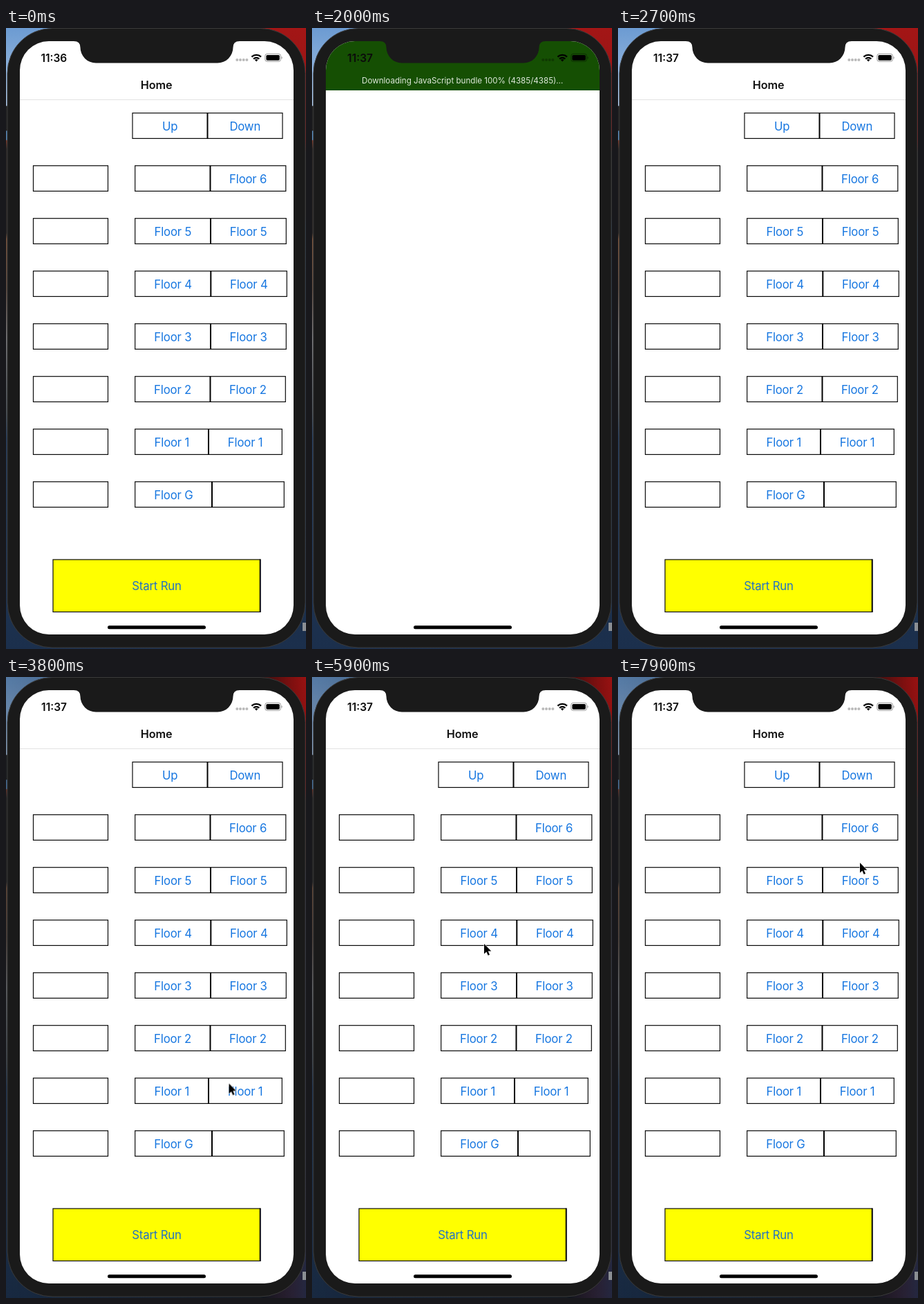
Animation, 434 px wide and 896 px high, one loop 8 s. Source, as an HTML page:

```html
<!DOCTYPE html>
<html lang="en">
<head>
<meta charset="utf-8">
<title>Elevator</title>
<style>
html, body { margin: 0; width: 100%; height: 100%; overflow: hidden; background: #1a1a1a; }
svg { display: block; width: 434px; height: 896px; }
text { font-family: Inter, Roboto, sans-serif; text-anchor: middle; }
.label { font-size: 16.8px; letter-spacing: -.2px; fill: #1676e0; }
.run { fill: #2371c4; }
.title { font-size: 16.2px; font-weight: 600; letter-spacing: -.1px; fill: #111; }
.clock { font-size: 15.5px; font-weight: 600; fill: #0b0b0b; }
.note { font-size: 11.6px; fill: #dfe9dc; }
.box { fill: none; stroke: #0a0a0a; stroke-width: 1.2; }

.early, .late, .page, .banner, .dusk { animation: 8s step-end infinite; }
.early { animation-name: early; }
.late { animation-name: late; }
.page { animation-name: page; }
.banner { animation-name: banner; }
.dusk { animation-name: dusk; }
.cursor { animation: show 8s step-end infinite, move 8s linear infinite; }

@keyframes early { 0% { opacity: 1 } 20%, 100% { opacity: 0 } }
@keyframes late { 0% { opacity: 0 } 20%, 100% { opacity: 1 } }
@keyframes page { 0% { opacity: 1 } 25% { opacity: 0 } 30%, 100% { opacity: 1 } }
@keyframes banner { 0% { opacity: 0 } 25% { opacity: 1 } 32.5% { opacity: .5 } 33.75%, 100% { opacity: 0 } }
@keyframes dusk { 0% { opacity: 0 } 46.25%, 100% { opacity: 1 } }
@keyframes show { 0% { opacity: 0 } 37.5%, 100% { opacity: 1 } }
/* the pointer is sampled ten times a second */
@keyframes move {
  0%, 36.25% { transform: translate(424px, 812px); animation-timing-function: steps(6) }
  43.75%, 45% { transform: translate(318px, 600px); animation-timing-function: steps(11) }
  58.75% { transform: translate(343px, 526px); animation-timing-function: steps(7) }
  67.5%, 70% { transform: translate(338px, 513px); animation-timing-function: steps(3) }
  73.75% { transform: translate(249px, 385px); animation-timing-function: steps(3) }
  77.5%, 78.75% { transform: translate(243px, 306px); animation-timing-function: steps(9) }
  90%, 92.5% { transform: translate(328px, 437px); animation-timing-function: steps(5) }
  98.75%, 100% { transform: translate(350px, 268px) }
}
</style>
</head>
<body>
<svg viewBox="0 0 434 896">
  <defs>
    <linearGradient id="left" x2="0" y2="1">
      <stop offset="0" stop-color="#6c9bd2"/>
      <stop offset=".125" stop-color="#a9c3e2"/>
      <stop offset=".126" stop-color="#222"/>
      <stop offset=".165" stop-color="#222"/>
      <stop offset=".166" stop-color="#5584b4"/>
      <stop offset=".18" stop-color="#5584b4"/>
      <stop offset=".181" stop-color="#7a3a2c"/>
      <stop offset=".195" stop-color="#2a2725"/>
      <stop offset=".33" stop-color="#2a2725"/>
      <stop offset=".34" stop-color="#74513b"/>
      <stop offset=".42" stop-color="#5b4a40"/>
      <stop offset=".5" stop-color="#77777a"/>
      <stop offset=".62" stop-color="#4a5056"/>
      <stop offset=".66" stop-color="#263d5c"/>
      <stop offset="1" stop-color="#1b2f4c"/>
    </linearGradient>
    <linearGradient id="right" x2="0" y2="1">
      <stop offset="0" stop-color="#a31616"/>
      <stop offset=".18" stop-color="#8c1414"/>
      <stop offset=".2" stop-color="#333"/>
      <stop offset=".3" stop-color="#333"/>
      <stop offset=".32" stop-color="#24384f"/>
      <stop offset="1" stop-color="#1b2f4c"/>
    </linearGradient>
    <linearGradient id="shade">
      <stop offset="0" stop-color="#101820" stop-opacity=".25"/>
      <stop offset=".86" stop-color="#101010" stop-opacity=".75"/>
      <stop offset="1" stop-color="#500" stop-opacity=".15"/>
    </linearGradient>
    <clipPath id="screen"><rect x="20" y="19" width="396" height="856" rx="42"/></clipPath>
  </defs>

  <rect width="217" height="896" fill="url(#left)"/>
  <rect x="217" width="217" height="896" fill="url(#right)"/>
  <rect class="dusk" width="434" height="896" fill="url(#shade)"/>
  <path d="M429 858h5v12h-5z" fill="#8b8f94"/>
  <rect x="2" y=".5" width="431" height="893.5" rx="65" fill="#1a1a1a" stroke="#3b3b3b"/>

  <g clip-path="url(#screen)">
    <rect x="20" y="19" width="396" height="856" fill="#fff"/>
    <g class="page">
      <path d="M20 103.5H416" stroke="#e2e2e2"/>
      <text class="title" x="217.7" y="88">Home</text>
      <g id="rows"></g>
      <rect x="68" y="767" width="300" height="75.5" fill="#ff0" stroke="#0a0a0a" stroke-width="1.2"/>
      <path d="M367.6 766.5V843" stroke="#0a0a0a" stroke-width="1.8"/>
      <text class="label run" x="218" y="811">Start Run</text>
    </g>
    <g class="banner">
      <rect x="20" y="19" width="396" height="71" fill="#154f03"/>
      <text class="note" x="217.7" y="80">Downloading JavaScript bundle 100% (4385/4385)…</text>
    </g>
    <text class="clock early" x="69.3" y="48.5">11:36</text>
    <text class="clock late" x="69.5" y="48.5">11:37</text>
    <g fill="#000" opacity=".27">
      <circle cx="334.3" cy="46" r="2"/><circle cx="339" cy="46" r="2"/>
      <circle cx="343.7" cy="46" r="2"/><circle cx="348.4" cy="46" r="2"/>
    </g>
    <g fill="none" stroke="#000" stroke-width="2.3">
      <path d="M355.4 41.6a9.8 9.8 0 0 1 13.6 0"/>
      <path d="M358.1 44.6a6 6 0 0 1 8.2 0"/>
    </g>
    <path d="M362.2 48.6l-2.3-2.5a3.3 3.3 0 0 1 4.6 0z"/>
    <rect x="374.8" y="37.3" width="22.6" height="11" rx="3" fill="none" stroke="#000" stroke-opacity=".4"/>
    <rect x="376.4" y="38.9" width="19.4" height="7.8" rx="1.7"/>
    <path d="M398.6 41a2.2 2.2 0 0 1 0 3.8z" opacity=".45"/>
    <rect x="147" y="862.3" width="142" height="5" rx="2.5"/>
  </g>
  <path d="M98 18V19Q107.500 19 107.500 28A22.500 22.500 0 0 0 130 50.500H306A22.500 22.500 0 0 0 328.500 28Q328.500 19 338 19V18Z" fill="#1a1a1a"/>

  <path class="cursor" d="M0 0V14.600L3.400 11.400 5.700 16.800 8 15.800 5.700 10.500H10.300Z" stroke="#fff" stroke-width="1.1" paint-order="stroke"/>
</svg>
<script>
// left edge, divider, right edge, up label, down label
const rows = [
  [183, 291.5, 400, 'Up', 'Down'],
  [186.7, 295.5, 404.8, '', 'Floor 6'],
  [186.7, 296, 405.3, 'Floor 5', 'Floor 5'],
  [186.7, 296.3, 406.3, 'Floor 4', 'Floor 4'],
  [186.7, 296, 405.3, 'Floor 3', 'Floor 3'],
  [186.7, 295.5, 404.3, 'Floor 2', 'Floor 2'],
  [186.7, 293, 399.3, 'Floor 1', 'Floor 1'],
  [186.7, 298, 402.3, 'Floor G', '']
];
const box = (x, y, w) => `<rect class="box" x="${x}" y="${y}" width="${w}" height="36.700"/>`;
const label = (a, b, y, s) => `<text class="label" x="${(a + b) / 2}" y="${y + 25.2}">${s}</text>`;

document.getElementById('rows').innerHTML = rows.map(([a, m, b, up, down], i) => {
  const y = 122.7 + 76 * i;
  return (i ? box(39.5, y, 108) : '') + box(a, y, b - a) +
    `<path d="M${m} ${y}v36.700" stroke="#000" stroke-width="2"/>` +
    label(a, m, y, up) + label(m, b, y, down);
}).join('');
</script>
</body>
</html>
```
